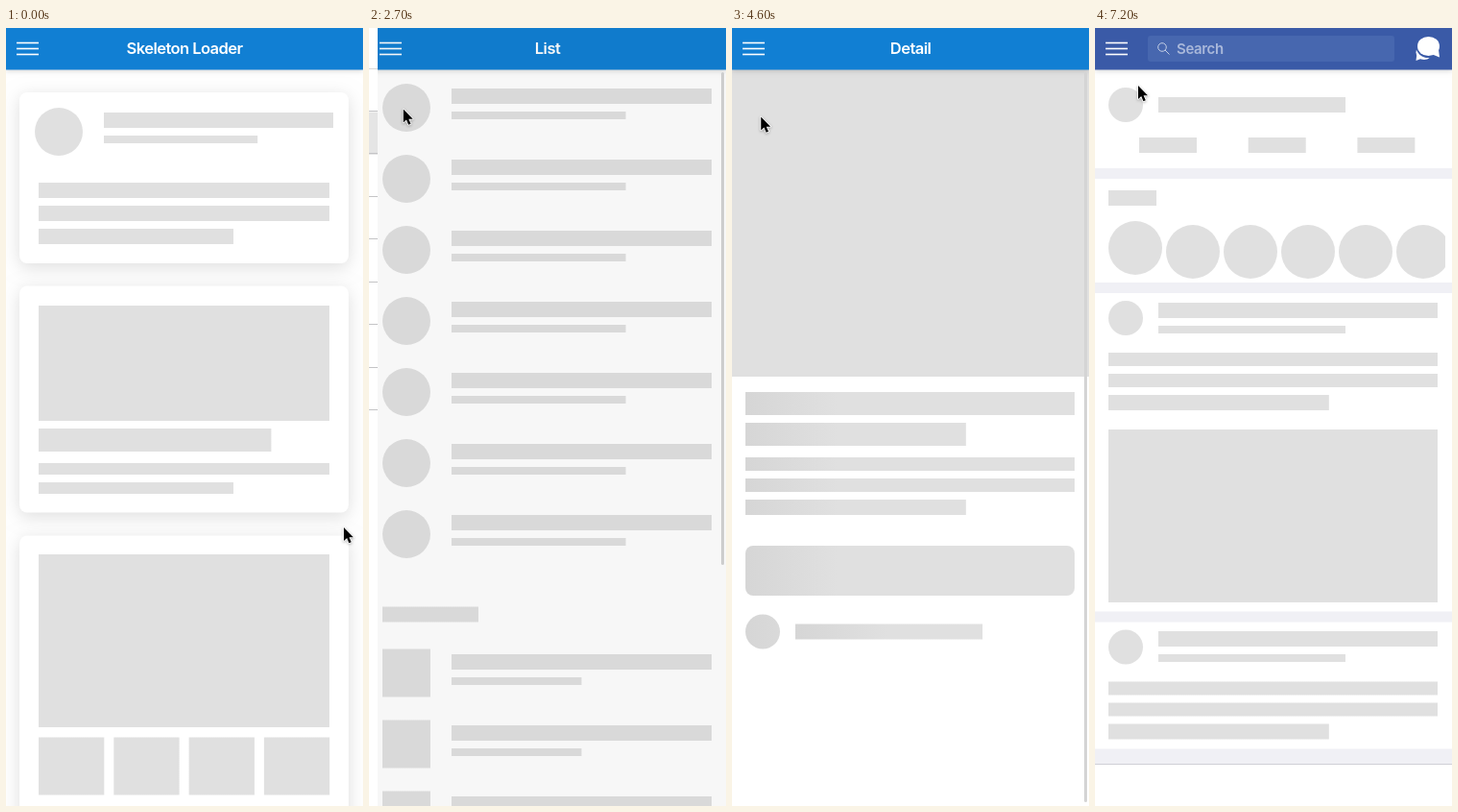
Recreate the animation shown at these times as an HTML page with a canvas. Size 372x810 px, loop 7.3 s.

```html
<!DOCTYPE html>
<html lang="en">
<head>
<meta charset="utf-8">
<title>Skeleton Loader</title>
<style>
html, body { margin: 0; width: 372px; height: 810px; overflow: hidden; background: #fff; }
canvas { display: block; }
</style>
</head>
<body>
<canvas id="stage" width="372" height="810"></canvas>
<script>
const W = 372, H = 810, LOOP = 7300, STEP = 100;
const MENU = 302, ROW = 44.45, SLIDE = 400, SHIMMER = 1800;
const PAD = 14, FULL = W - 2 * PAD - 1, SHORT = 0.67; // SHORT: width of a closing line
const BLUE = '#117fd3', INDIGO = '#3a5aa7', GREY = '#e0e0e0';
const c = document.getElementById('stage').getContext('2d');
const clamp = v => Math.max(0, Math.min(1, v));
const mix = (a, b, k) => a + (b - a) * k;
const easeOut = v => 1 - (1 - clamp(v)) ** 2;

const items = ['Skeleton Loader', 'List', 'Detail', 'Mingleby', 'Stickleaf',
  'Notifications', 'Table', 'www.takethatdesign.com'];

const visits = [
  { open: 1428, close: 2370, row: 1, pick: { x: 41, y: 106 } },
  { open: 3000, close: 4024, row: 2, pick: { x: 42, y: 176 } },
  { open: 4900, close: 5800, row: 3, pick: { x: 46, y: 200 } },
];

const pages = [
  { draw: cardsPage, shimmerFrom: 340 },
  { draw: listPage, shimmerFrom: visits[0].close, bar: 513 },
  { draw: detailPage, shimmerFrom: visits[1].close, bar: 760 },
  { draw: feedPage, shimmerFrom: 5210, bar: 410 },
];

let shift = 0; // shimmer offset within each block

function rect(x, y, w, h, color, r = 0) {
  c.fillStyle = color;
  c.beginPath();
  c.roundRect(x, y, w, h, r);
  c.fill();
}

function ellipse(x, y, rx, ry, color) {
  c.fillStyle = color;
  c.beginPath();
  c.ellipse(x, y, rx, ry, 0, 0, 7);
  c.fill();
}

function line(color, width, ...pts) {
  c.strokeStyle = color;
  c.lineWidth = width;
  c.beginPath();
  pts.forEach(([x, y]) => c.lineTo(x, y));
  c.stroke();
}

function text(s, x, y, color, font, align = 'left', spacing = -0.42) {
  c.font = font + ' Inter, Roboto, sans-serif';
  c.letterSpacing = spacing + 'px';
  c.textAlign = align;
  c.fillStyle = color;
  c.fillText(s, x, y);
}

const title = (s, x, color) => text(s, x, 27, color, '600 16.5px', 'center', -0.55);

function shadowed(blur, dy, alpha, draw) {
  c.save();
  c.shadowColor = `rgba(0,0,0,${alpha})`;
  c.shadowBlur = blur;
  c.shadowOffsetY = dy;
  draw();
  c.restore();
}

// Skeleton parts

function block(x, y, w, h, r = 0) {
  const g = c.createLinearGradient(x + shift + 64, 0, x + shift + 264, 0);
  g.addColorStop(0, GREY);
  g.addColorStop(0.4, '#d3d3d3');
  g.addColorStop(1, GREY);
  rect(x, y, w, h, g, r);
}

const disc = (x, y, d) => block(x, y, d, d, d / 2);

// Picture with a heading and a subheading beside it
function entry(x, y, size, right, sub = SHORT, r = size / 2) {
  const left = Math.round(x + size * 1.44), top = Math.floor(y + size / 4 - 7);
  block(x, y, size, size, r);
  block(left, top, right - left, 16);
  block(left, top + 24, (right - left) * sub, 8);
}

function paragraph(x, y, w, h, step) {
  block(x, y, w, h);
  block(x, y + step, w, h);
  block(x, y + 2 * step, w * SHORT, 16);
}

function byline(y) {
  disc(PAD, y, 36);
  block(66, y + 10, 195, 16);
}

function header(name, color = BLUE) {
  shadowed(5, 1, 0.15, () => rect(0, 0, W, 43.5, color));
  for (let y = 15.5; y < 30; y += 6) line('#fff', 1.6, [11, y], [34, y]);
  if (name) title(name, W / 2, '#fff');
}

// Pages

function card(y, h) {
  shadowed(18, 4, 0.13, () => rect(PAD, y, FULL, h, '#fff', 8));
}

function cardsPage() {
  const x = PAD + 20, w = FULL - 40;
  card(67, 178);
  entry(30, 83, 50, 341);
  paragraph(x, 161, w, 16, 24);

  card(268.5, 236);
  rect(x, 289, w, 120, GREY);
  block(x, 417, w * 0.8, 24);
  block(x, 453, w, 12);
  block(x, 473, w * SHORT, 12);

  card(528.5, H);
  block(x, 548, w, 180);
  for (let i = 0; i < 4; i++) block(x + i * 78.3, 738.5, 68.3, 60);
  header('Skeleton Loader');
}

function listPage() {
  for (let i = 0; i < 7; i++) entry(PAD, 58 + i * 74, 50, PAD + FULL);
  block(PAD, 602.5, 100, 16);
  for (let y = 646.5; y < H; y += 74) entry(PAD, y, 50, PAD + FULL, 0.5, 0);
  header('List');
}

function detailPage() {
  rect(0, 43, W, 320, GREY);
  block(PAD, 379, FULL, 24);
  block(PAD, 411, FULL * SHORT, 24);
  paragraph(PAD, 447, FULL, 14, 22);
  block(PAD, 539, FULL, 52, 8);
  byline(610.5);
  header('Detail');
}

function post(y) {
  entry(PAD, y, 36, PAD + FULL);
  paragraph(PAD, y + 54, FULL, 14, 22);
}

const divider = (y, h = 11) => rect(0, y, W, h, '#f0f0f5');

// Speech bubble; side is -1 for a tail on the left, 1 for the right
function bubble(x, y, r, side) {
  ellipse(x, y, r, r * 0.88, '#fff');
  c.beginPath();
  c.moveTo(x + side * r * 0.4, y + r * 0.75);
  c.lineTo(x + side * r, y + r);
  c.lineTo(x + side * r * 0.9, y + r * 0.2);
  c.fill();
}

function feedHeader() {
  header('', INDIGO);
  rect(55, 8, 257, 27, '#4767af', 3);
  c.strokeStyle = '#c3cee5';
  c.lineWidth = 1;
  c.beginPath();
  c.arc(70, 20, 4.3, 0, 7);
  c.stroke();
  line('#c3cee5', 1, [73, 23], [77.5, 27.5]);
  text('Search', 85, 27, '#a9b8da', '600 15px', 'left', -0.35);
  bubble(343, 25.5, 8.5, -1);
  ellipse(347.5, 19.5, 13, 11.5, INDIGO);
  bubble(347.5, 19, 11.5, 1);
}

function feedPage() {
  byline(62);
  for (let i = 0; i < 3; i++) block(46 + i * 113.7, 114, 60, 16);
  divider(146);
  block(PAD, 169, 50, 16);
  disc(PAD, 201, 56);
  c.save();
  c.beginPath();
  c.rect(0, 200, 365, 65);
  c.clip();
  for (let x = PAD + 60; x < W; x += 60) disc(x, 205, 56);
  c.restore();
  divider(265);
  post(284);
  block(PAD, 418, FULL, 180);
  divider(607.5);
  post(626.5);
  divider(750.5, 16);
  rect(0, 766, W, 1, '#d0d0d6');
  feedHeader();
}

// Overlays

function scrollbar(x, h, age) {
  c.globalAlpha = age < 0 ? 0 : clamp((800 - age) / 150);
  rect(x, 46, 3, h, '#d4d4d4', 1.5);
  c.globalAlpha = 1;
}

function menuRow(name, i, pressed) {
  const y = 42 + i * ROW, mid = y + 22.5, link = name.startsWith('www');
  const color = link ? '#2080c8' : '#222';
  if (pressed) rect(0, y + 1, MENU, ROW, '#e5e5e5');
  rect(0, Math.round(y + 44), MENU, 1, '#c4c4c6');
  text(name, PAD, mid + 6, color, '400 17px');
  if (link) rect(PAD, Math.round(mid + 8), c.measureText(name).width, 1, color);
  else line('#c6c6ca', 2, [280.5, mid - 7], [287.5, mid], [280.5, mid + 7]);
}

function menu(shown, age, pressed) {
  c.fillStyle = `rgba(0,0,0,${0.36 * shown ** 0.7})`;
  c.fillRect(0, 0, W, H);
  c.save();
  c.translate(Math.round(MENU * (shown - 1)), 0);
  rect(0, 0, MENU, H, '#fff');
  rect(0, 42, MENU, 1, '#d9d9d9');
  title('Menu', MENU / 2 - 0.5, '#222');
  items.forEach((name, i) => menuRow(name, i, i === pressed));
  scrollbar(296, 760, age);
  c.restore();
}

// The pointer goes to the menu button, to the chosen row, and back
const button = { x: 20, y: 20 };
const route = [
  { t: 0, x: 352, y: 520 },
  { t: 800, ...button },
  ...visits.flatMap(v => [
    { t: v.open, ...button },
    { t: v.open + 100, ...button },
    { t: v.close - 100, ...v.pick },
    { t: v.close + 230, ...v.pick },
  ]),
  { t: 6900, ...visits[2].pick },
  { t: 7200, x: 45, y: 60 },
];
const arrow = new Path2D('M0 0V14L3.2 11 5.4 16.2 7.8 15.2 5.6 10.2H10Z');

function pointer(t) {
  const i = Math.max(1, route.findIndex(k => k.t >= t));
  const a = route[i - 1], b = route[i], k = (t - a.t) / (b.t - a.t);
  c.save();
  c.translate(mix(a.x, b.x, k), mix(a.y, b.y, k));
  c.lineJoin = 'round';
  c.strokeStyle = '#fff';
  c.lineWidth = 1.6;
  shadowed(3, 1, 0.3, () => c.stroke(arrow));
  c.fillStyle = '#000';
  c.fill(arrow);
  c.restore();
}

function draw(t) {
  rect(0, 0, W, H, '#fff');
  const index = visits.filter(v => t >= v.close).length;
  const page = pages[index];
  shift = 936 * (((t - page.shimmerFrom) / SHIMMER + 1) % 1) - 468;
  page.draw();
  if (page.bar) scrollbar(367, page.bar, t - visits[index - 1].close);
  for (const { open, close, row } of visits) {
    const shown = easeOut((t - open) / SLIDE) - easeOut((t - close) / SLIDE);
    if (shown > 0) menu(shown, t - open, t > close - 120 ? row : -1);
  }
  pointer(t);
}

const begin = performance.now();
function frame() {
  const t = (performance.now() - begin) % LOOP;
  draw(Math.floor(t / STEP) * STEP);
  requestAnimationFrame(frame);
}
frame();
</script>
</body>
</html>
```
